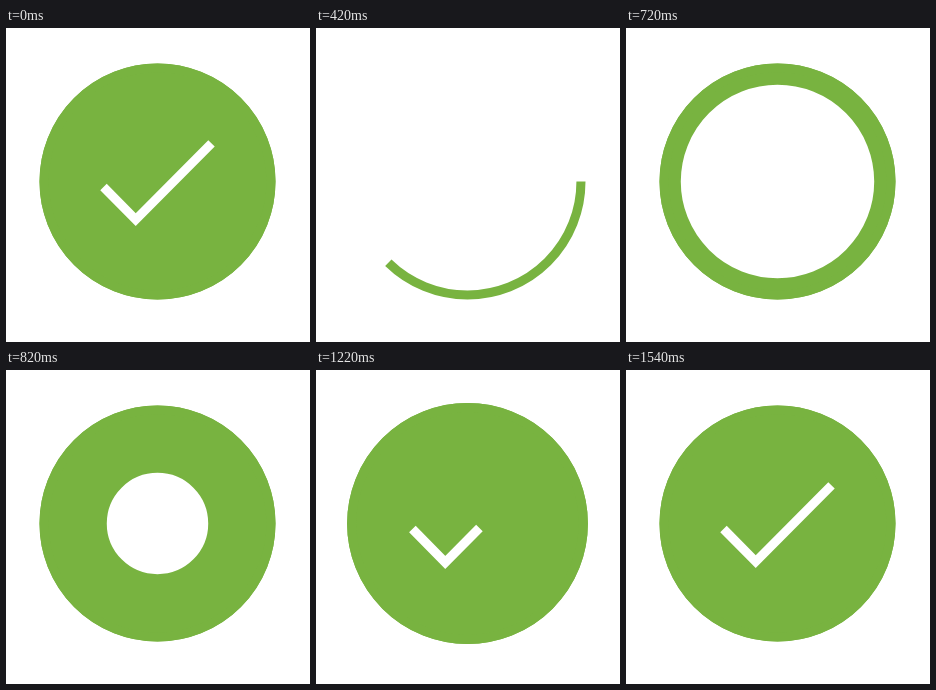
An HTML page with a canvas that plays this animation: 304x314 px, repeating every 1880 ms.

```html
<!DOCTYPE html>
<html lang="en">
<head>
<meta charset="utf-8">
<title>Checkmark</title>
<style>
  html, body { margin: 0; width: 100%; height: 100%; overflow: hidden; background: #fff; }
  canvas { display: block; width: 304px; height: 314px; }
</style>
</head>
<body>
<canvas id="stage"></canvas>
<script>
const WIDTH = 304, HEIGHT = 314;
const LOOP = 1880, TICK = 20;
const GREEN = '#78b340';
const CENTER = { x: 151.5, y: 153.5 };
const UNIT = 236 / 52; // the icon is drawn on a 52 unit grid
const RADIUS = 26;

const canvas = document.getElementById('stage');
const ctx = canvas.getContext('2d');
const density = window.devicePixelRatio || 1;
canvas.width = WIDTH * density;
canvas.height = HEIGHT * density;

// Cubic bezier easing with y handles at 0 and 1
function bezier(x1, x2) {
  return x => {
    if (x <= 0) return 0;
    if (x >= 1) return 1;
    let low = 0, high = 1;
    for (let i = 0; i < 24; i++) {
      const t = (low + high) / 2, s = 1 - t;
      if (3 * s * s * t * x1 + 3 * s * t * t * x2 + t * t * t < x) low = t;
      else high = t;
    }
    return low * low * (3 - 2 * low);
  };
}

const easeStroke = bezier(0.65, 0.45);
const easeInOut = bezier(0.42, 0.58);
const progress = (time, start, duration) => (time - start) / duration;

function circle(radius, width, angle = 2 * Math.PI) {
  ctx.beginPath();
  ctx.arc(0, 0, radius, 0, angle);
  ctx.lineWidth = width;
  ctx.strokeStyle = GREEN;
  ctx.stroke();
}

function drawRing(amount) {
  const angle = Math.min(amount * 166 / 25, 2 * Math.PI);
  if (angle > 0) circle(25, 2, angle);
}

function drawFill(amount) {
  const depth = Math.min(amount * 26.44, RADIUS);
  if (depth > 0) circle(RADIUS - depth / 2, depth);
}

function drawCheck(amount) {
  if (amount <= 0) return;
  ctx.beginPath();
  ctx.moveTo(-11.9, 1.2);
  ctx.lineTo(-4.8, 8.4);
  ctx.lineTo(11.9, -8.4);
  ctx.setLineDash([48 * amount, 100]);
  ctx.lineWidth = 2;
  ctx.strokeStyle = '#fff';
  ctx.stroke();
  ctx.setLineDash([]);
}

function pulse(time) {
  const p = 2 * progress(time, 1162, 372);
  return 1 + 0.1 * easeInOut(p < 1 ? p : 2 - p);
}

function draw(time) {
  // The loop opens on the finished icon for a single tick
  if (time < TICK) time = LOOP;
  ctx.setTransform(density, 0, 0, density, 0, 0);
  ctx.fillStyle = '#fff';
  ctx.fillRect(0, 0, WIDTH, HEIGHT);
  ctx.translate(CENTER.x, CENTER.y);
  const scale = UNIT * pulse(time);
  ctx.scale(scale, scale);
  drawFill(easeInOut(progress(time, 600, 411)));
  drawRing(easeStroke(progress(time, 90, 695)));
  drawCheck(easeStroke(progress(time, 1037, 360)));
}

const begin = performance.now();
function frame() {
  const time = (performance.now() - begin) % LOOP;
  draw(Math.floor(time / TICK) * TICK);
  requestAnimationFrame(frame);
}
frame();
</script>
</body>
</html>
```
